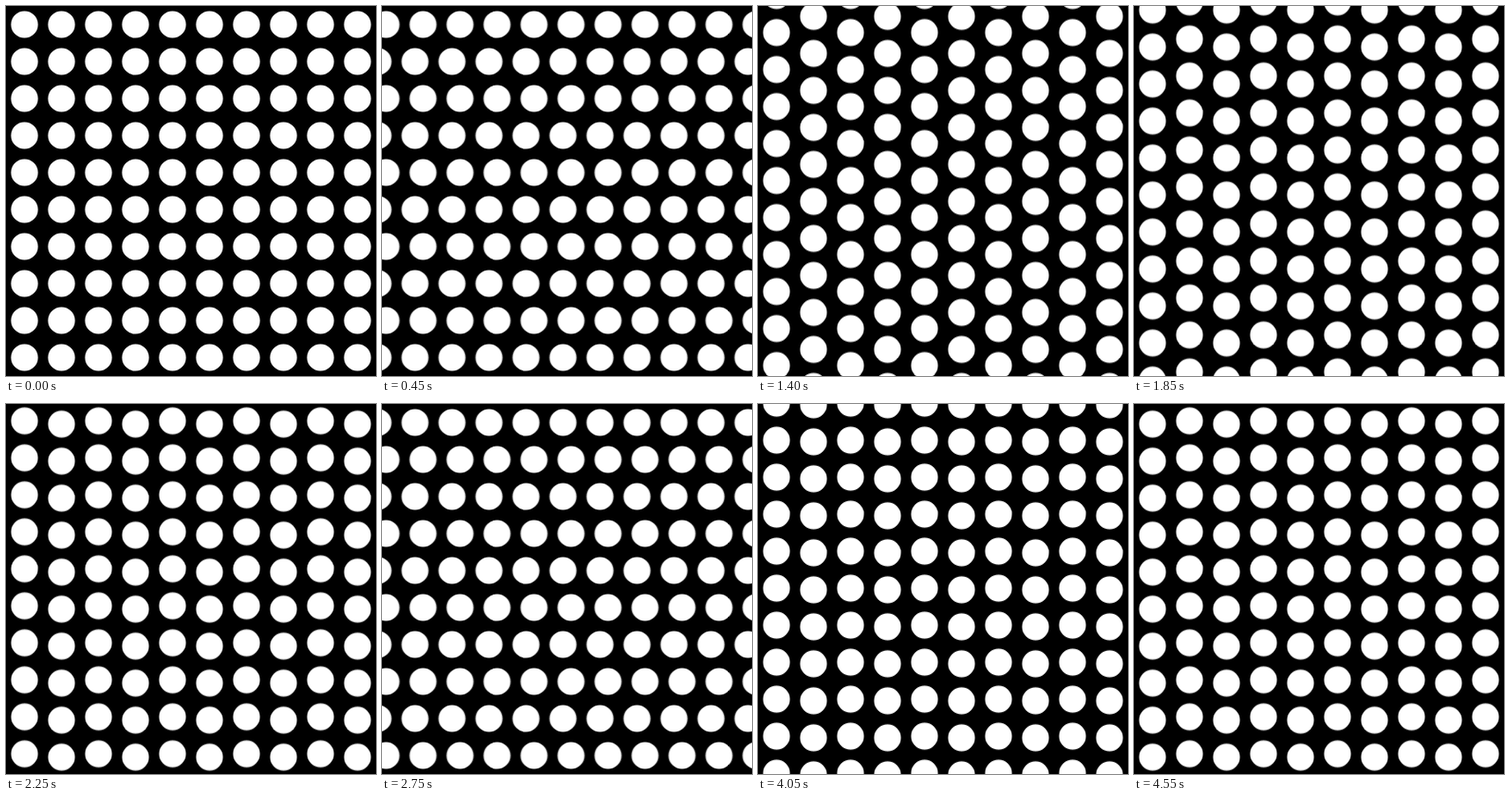
An HTML page that plays this animation: 400x400 px, repeating every 4600 ms.

```html
<!DOCTYPE html>
<html lang="en">
<head>
<meta charset="utf-8">
<title>Sliding dots</title>
<style>
  html, body {
    margin: 0;
    width: 100%;
    height: 100%;
    overflow: hidden;
    background: #000;
  }
  svg {
    display: block;
    width: 400px;
    height: 400px;
  }
  /* Zero-length dashes with round caps draw the dots. */
  path {
    fill: none;
    stroke: #fff;
    stroke-width: 29.2px;
    stroke-linecap: round;
    stroke-dasharray: 0 40;
    animation: slide 4600ms var(--start) infinite;
  }
  g {
    animation: show 2300ms var(--start) step-end infinite;
  }
  /* A few ms of lead keep step edges away from whole ticks. */
  .rows { --start: -4ms; }
  .cols { --start: -3454ms; }
  .back { --shift: -40px; }
  .forth { --shift: 40px; }

  /* One pitch out, later one pitch the other way; hidden in between. */
  @keyframes slide {
    0%, 50% {
      transform: translateX(0);
      animation-timing-function: steps(23);
    }
    25% {
      transform: translateX(var(--shift));
      animation-timing-function: step-end;
    }
    75% {
      transform: translateX(calc(-1 * var(--shift)));
      animation-timing-function: step-end;
    }
    100% { transform: translateX(0); }
  }
  @keyframes show {
    0% { visibility: visible; }
    50%, 100% { visibility: hidden; }
  }
</style>
</head>
<body>
<svg viewBox="0 0 400 400">
  <g class="rows">
    <path class="back" d="M-60 20h520m-520 80h520m-520 80h520m-520 80h520m-520 80h520"/>
    <path class="forth" d="M-60 60h520m-520 80h520m-520 80h520m-520 80h520m-520 80h520"/>
  </g>
  <!-- Same lines with x and y swapped. -->
  <g class="cols" transform="matrix(0 1 1 0 0 0)">
    <path class="forth" d="M-60 20h520m-520 80h520m-520 80h520m-520 80h520m-520 80h520"/>
    <path class="back" d="M-60 60h520m-520 80h520m-520 80h520m-520 80h520m-520 80h520"/>
  </g>
</svg>
</body>
</html>
```
